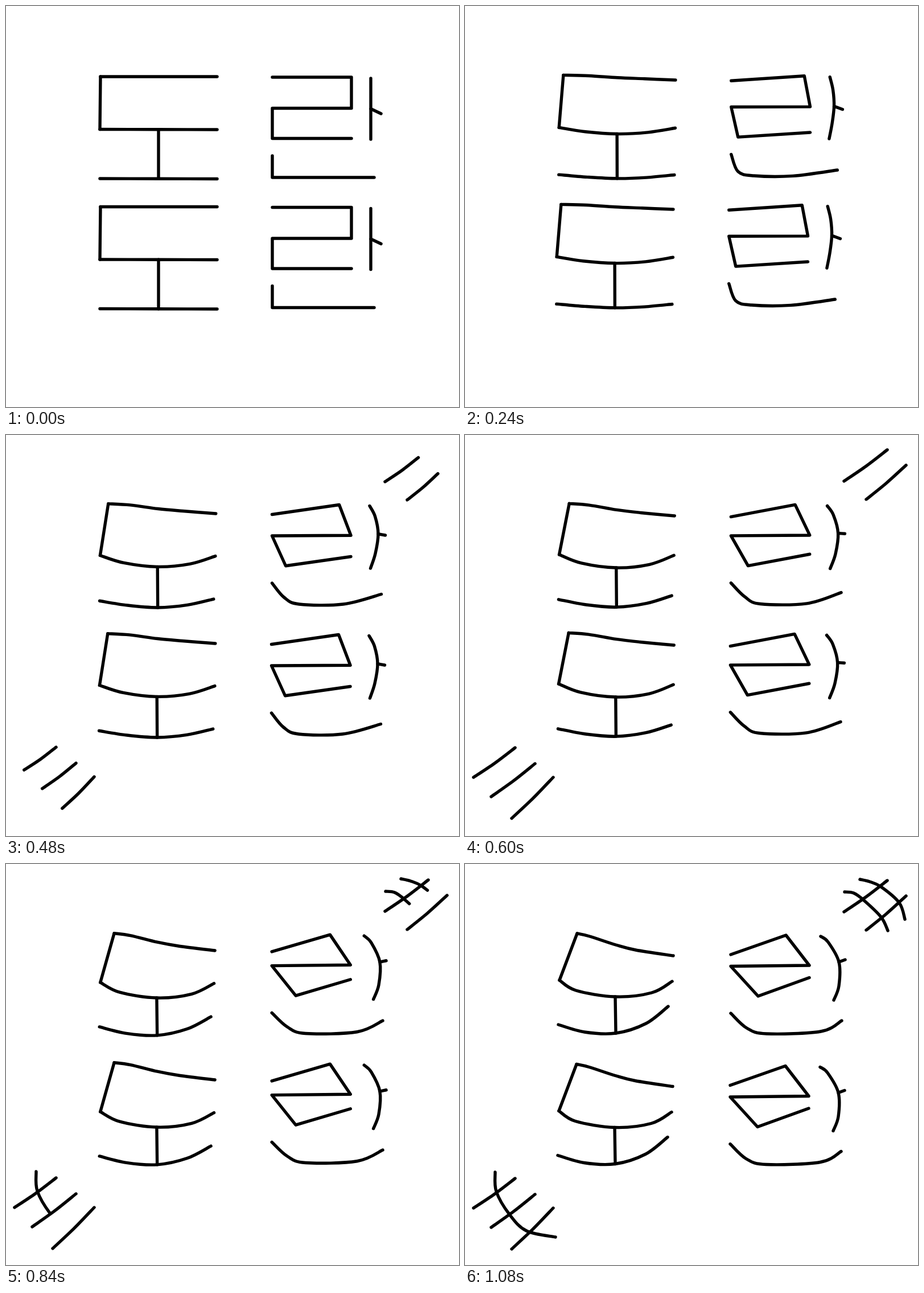
These frames come from a looping animation (796 px wide and 704 px high, 1.2 s). An HTML page with a canvas:

```html
<!DOCTYPE html>
<html lang="ko">
<head>
<meta charset="utf-8">
<title>Squashing letters</title>
<style>
  html, body { margin: 0; width: 100%; height: 100%; overflow: hidden; background: #fff; }
  canvas { display: block; }
</style>
</head>
<body>
<canvas id="stage" width="796" height="704"></canvas>
<script>
const ctx = document.getElementById('stage').getContext('2d');
const STEP = 120, STEPS = 10;

// Hand-held wobble per drawing: height of the sheet, offset of the lower word.
const lift = [0, -1, -2, 0, -2, -2, 0, 0, -1, 1];
const drift = [0, -2, -4, 0, -1, -1, -1, 0, 0, -1];
const gap = [228.5, 228, 227, 231.5, 228, 227, 226, 227, 228, 229.5];

// n evenly spaced points on a straight line
const line = (x, y, u, w, n = 5) => Array.from({ length: n }, (_, i) =>
  [x + (u - x) * i / (n - 1), y + (w - y) * i / (n - 1)]).flat();

// Each part moves from rest to squashed and swings out by swing on the way.
const top1 = {
  rest: line(166, 124, 371, 124),
  squashed: [197, 121, 219, 126, 265, 141, 300, 150, 366, 160]
};
const middle = {
  rest: line(165, 216.5, 371, 217),
  squashed: [166, 203, 195, 221, 264, 232, 328, 225, 364, 205],
  swing: [0, 3, 0, 8, 0, 10, 0, 8, 0, 3]
};
const base = {
  rest: line(165, 303, 371, 303.5),
  squashed: [164, 281, 210, 294, 265, 296, 318, 279, 357, 249],
  swing: [0, 0, 0, 2, 0, 5, 0, 8, 0, 11]
};
const rieul = {
  rest: [468, 125, 607, 125, 607, 179.5, 468, 179.5, 468, 232.5, 607, 232.5],
  squashed: [467, 158, 564, 124, 605, 177, 467, 178.5, 515, 231, 605, 198.5]
};
// Five points of the upright, then the tip of its tick.
const vowel = {
  rest: [...line(641, 127, 641, 234), 659, 189],
  squashed: [625, 126, 638, 136, 657, 171, 657, 213, 648, 238, 668, 167],
  swing: [6, 0, 9, 0, 5, 0, 0, 0, -4, 0, 3, 0]
};
const nieun = {
  rest: [468, 263, 468, 301, 500, 301, 560, 301, 647, 301],
  squashed: [467, 261, 495, 287, 530, 297, 625, 293, 662, 274],
  swing: [0, 0, 7, -7, 0, 0, 0, 2, 5, -6]
};

const leftRays = [[88, 550, 15, 602], [123, 578, 46, 636], [155, 602, 82, 674]];
const rightRays = [[666, 82, 742, 27], [705, 114, 775, 54]];
const arcs = [
  [53, 539, 55, 573, 78, 613, 108, 642, 159, 653],
  [667, 47, 683, 49, 700, 61, 731, 91, 743, 115],
  [694, 25, 711, 29, 731, 38, 763, 66, 773, 95]
];

function pose({ rest, squashed, swing }, p) {
  const s = Math.sin(Math.PI * p);
  return rest.map((v, k) => v + (squashed[k] - v) * p + (swing ? swing[k] * s : 0));
}

// Spline through the points; bend 0 gives straight segments.
function stroke(p, bend = 1) {
  const n = p.length / 2, k = bend / 6;
  const at = i => {
    const j = Math.max(0, Math.min(n - 1, i)) * 2;
    return [p[j], p[j + 1]];
  };
  ctx.beginPath();
  ctx.moveTo(p[0], p[1]);
  for (let i = 0; i < n - 1; i++) {
    const [a, b, c, d] = [at(i - 1), at(i), at(i + 1), at(i + 2)];
    ctx.bezierCurveTo(
      b[0] + (c[0] - a[0]) * k, b[1] + (c[1] - a[1]) * k,
      c[0] - (d[0] - b[0]) * k, c[1] - (d[1] - b[1]) * k,
      c[0], c[1]);
  }
  ctx.stroke();
}

function pathLength(p) {
  let sum = 0;
  for (let i = 2; i < p.length; i += 2) sum += Math.hypot(p[i] - p[i - 2], p[i + 1] - p[i - 1]);
  return sum;
}

function drawWord(step) {
  const left = step / 9, right = Math.min(1, step / 8), bend = Math.min(1, step / 2);
  const t = pose(top1, left), m = pose(middle, left), b = pose(base, left);
  const v = pose(vowel, right);
  stroke(t, bend);
  stroke([t[0], t[1], m[0], m[1]]);
  stroke(m, bend);
  stroke(b, bend);
  stroke([m[4], m[5], b[4], b[5]]);
  stroke(pose(rieul, right), 0);
  stroke(v.slice(0, 10), bend);
  stroke([v[4], v[5], v[10], v[11]]);
  stroke(pose(nieun, right), bend);
}

function drawRays(rays, grow, shift) {
  for (const [x, y, u, w] of rays) {
    const dx = (u - x) * grow, dy = (w - y) * grow, top = y + shift;
    stroke([x, top, x + dx / 2 + 0.7, top + dy / 2 + 1.2, x + dx, top + dy]);
  }
}

function drawSparks(step) {
  if (step < 3) return;
  const grow = Math.min(1, 0.32 + 0.45 * (step - 3));
  const slide = 18 * (1 - grow) ** 2;
  drawRays(leftRays, grow, -slide);
  drawRays(rightRays, grow, slide);
  if (step < 6) return;
  const reach = ((step - 5) / 4) ** 1.2;
  for (const arc of arcs) {
    ctx.setLineDash([pathLength(arc) * reach * 1.05, 999]);
    stroke(arc);
  }
  ctx.setLineDash([]);
}

function draw(step) {
  ctx.fillStyle = '#fff';
  ctx.fillRect(0, 0, 796, 704);
  ctx.strokeStyle = '#000';
  ctx.lineWidth = 5.4;
  ctx.lineCap = ctx.lineJoin = 'round';
  ctx.save();
  ctx.translate(0, lift[step]);
  drawWord(step);
  ctx.save();
  ctx.translate(drift[step], gap[step]);
  drawWord(step);
  ctx.restore();
  ctx.translate(0, 1);
  drawSparks(step);
  ctx.restore();
}

const start = performance.now();
function tick(now) {
  const t = Math.max(0, now - start);
  draw(Math.floor(t / STEP) % STEPS);
  requestAnimationFrame(tick);
}
draw(0);
requestAnimationFrame(tick);
</script>
</body>
</html>
```
